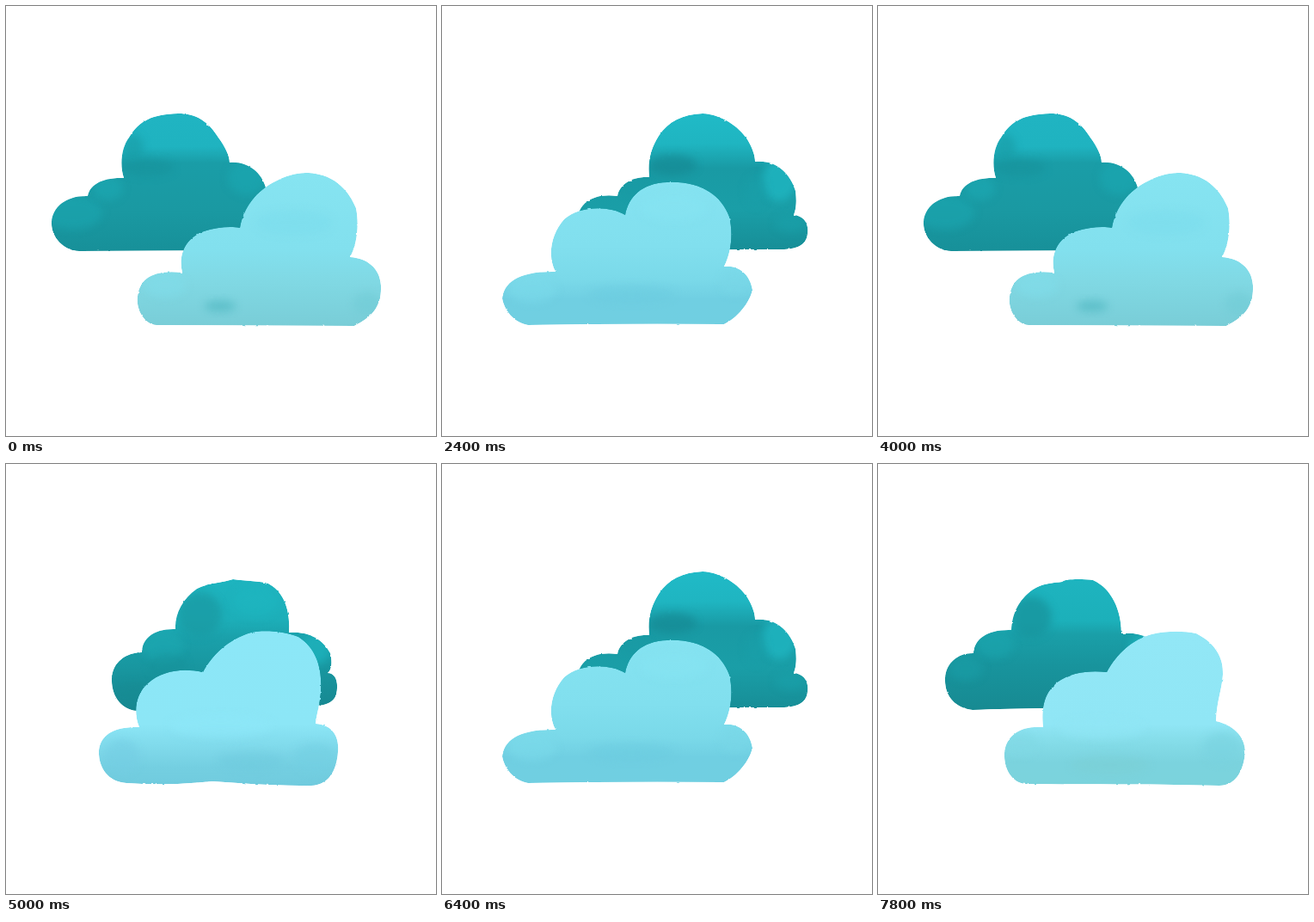
Recreate the animation shown at these times as an HTML page. Size 500x500 px, loop 8.01 s.

```html
<!DOCTYPE html>
<html lang="en">
<head>
<meta charset="utf-8">
<title>Drifting clouds</title>
<style>
html, body { margin: 0; width: 100%; height: 100%; overflow: hidden; background: #fff; }
svg { display: block; width: 100%; height: 100%; }
</style>
</head>
<body>
<svg id="stage" viewBox="0 0 500 500">
  <defs>
    <filter id="rough" color-interpolation-filters="sRGB">
      <feTurbulence type="fractalNoise" baseFrequency=".16" numOctaves="2" seed="4" result="noise"/>
      <feDisplacementMap in="SourceGraphic" in2="noise" scale="2" xChannelSelector="R" yChannelSelector="G"/>
      <feGaussianBlur stdDeviation=".4"/>
    </filter>
    <filter id="soft" x="-50%" y="-50%" width="200%" height="200%" color-interpolation-filters="sRGB">
      <feGaussianBlur stdDeviation="5"/>
    </filter>
  </defs>
</svg>
<script>
const stage = document.getElementById('stage');
const FRAME = 200, LOOP = 8010, HALF = 10, HOLD = 5;
const DARK_SPEED = 11.4, LIGHT_SPEED = -10;

// key: step at which the paths need no shift; stops: [offset, color]
// blobs: [cx, cy, rx, ry, color, opacity]
const drawings = [
  {
    key: 0,
    dark: {
      d: 'M85 285C66 284 52 268 53 251C54 234 70 220 95 221C97 208 112 199 137 200C132 185 134 165 143 153C155 133 170 126 200 125C222 125 236 135 247 153C255 164 260 174 260 182C280 180 297 193 302 211C306 226 304 238 300 243C320 243 325 270 305 284Z',
      stops: [[0, '#20b4c2'], [.24, '#1fb3c0'], [.36, '#1a9da7'], [.7, '#1a99a2'], [1, '#179099']],
      blobs: [[148, 165, 12, 16, '#1a9ea8', .7], [78, 240, 34, 20, '#1ba6b0', .6], [118, 212, 18, 14, '#1da9b3', .6],
        [280, 200, 22, 20, '#1ba8b2', .6], [165, 188, 30, 10, '#17929b', .6]]
    },
    light: {
      d: 'M175 371C160 370 151 352 153 338C155 318 170 306 205 310C200 290 208 270 230 262C245 257 262 256 272 258C276 235 290 215 315 203C330 195 342 194 352 194C385 196 400 218 407 235C411 255 408 278 400 292C420 293 435 305 436 325C437 350 425 362 405 372Z',
      stops: [[0, '#86e4f1'], [.5, '#82e0ee'], [.72, '#80d8e3'], [1, '#79cdd7']],
      blobs: [[249, 349, 18, 7, '#55bac4', .7], [335, 252, 45, 14, '#7bdcec', .5], [185, 325, 24, 14, '#80dce9', .6],
        [420, 346, 16, 13, '#70cad4', .5]]
    }
  },
  {
    key: 5,
    dark: {
      d: 'M152 287C135 286 122 270 123 249C124 230 140 219 158 219C158 203 172 191 197 192C196 175 205 157 222 145C235 138 252 138 264 134C280 136 296 136 305 139C322 148 331 168 329 196C350 194 368 203 377 220C380 232 378 240 374 243C384 243 387 255 384 268C381 278 370 281 360 281Z',
      stops: [[0, '#1eb4bf'], [.3, '#1dafb9'], [.45, '#1aa0aa'], [.7, '#18959e'], [1, '#178790']],
      blobs: [[225, 175, 26, 26, '#1a9aa3', .75], [182, 212, 24, 18, '#1da9b2', .6], [148, 268, 26, 14, '#178b93', .6],
        [290, 160, 28, 18, '#1eb7c1', .5], [360, 215, 18, 18, '#1eb2bc', .8], [188, 235, 22, 14, '#17929a', .5]]
    },
    light: {
      d: 'M140 371C118 370 107 352 108 333C110 315 125 305 155 306C148 290 150 268 165 255C182 240 205 237 229 242C240 222 258 204 285 196C300 192 325 195 340 201C362 215 368 240 366 265C365 280 361 292 360 302C378 303 388 315 386 335C384 358 375 373 355 374C320 374 280 372 240 369C200 373 170 373 140 371Z',
      stops: [[0, '#8ce7f7'], [.6, '#8ce6f6'], [.72, '#82dced'], [.88, '#74cfe1'], [1, '#70cbde']],
      blobs: [[135, 340, 20, 20, '#74cde3', .6], [250, 305, 60, 13, '#8de7f8', .6], [285, 345, 40, 10, '#6bc7db', .4],
        [360, 342, 26, 17, '#73cfe2', .6]]
    }
  },
  {
    key: 8,
    dark: {
      d: 'M188 284C170 284 155 268 157 250C158 232 172 217 204 221C206 208 220 198 241 199C239 180 243 165 252 151C263 134 280 126 303 125C325 126 345 140 355 155C361 165 364 174 364 181C388 178 405 195 411 215C413 230 411 238 409 243C420 244 427 252 425 265C424 278 412 283 395 283Z',
      stops: [[0, '#20bac7'], [.22, '#1fb5c1'], [.4, '#199aa4'], [.7, '#1a9ea7'], [1, '#178e97']],
      blobs: [[268, 185, 28, 12, '#168b95', .75], [392, 203, 20, 24, '#1fb3be', .9], [225, 210, 16, 12, '#1a9aa4', .6],
        [405, 253, 18, 10, '#1aa1aa', .6], [365, 215, 12, 18, '#1aa0aa', .5]]
    },
    light: {
      d: 'M100 371C82 368 72 352 70 340C72 322 88 308 132 309C122 290 127 265 142 248C160 232 195 232 213 243C217 222 232 206 262 205C300 203 325 220 334 245C339 265 336 288 328 303C345 301 358 312 361 330C358 345 343 363 328 370Q210 369 100 371Z',
      stops: [[0, '#85e3f1'], [.45, '#81dfee'], [.68, '#7ad9e9'], [.82, '#70cfe2'], [1, '#70cfe1']],
      blobs: [[105, 330, 28, 15, '#7bdaea', .6], [220, 335, 50, 10, '#6bcbdf', .5], [340, 322, 16, 14, '#78d6e6', .6],
        [270, 235, 40, 16, '#86e4f2', .5]]
    }
  },
  {
    key: 1,
    dark: {
      d: 'M110 286C90 284 77 270 78 249C79 230 95 219 111 220C112 203 128 192 155 193C156 175 163 158 180 146C190 139 205 138 214 137C218 133 240 134 250 135C272 145 283 170 283 197C306 195 322 203 331 220C334 232 332 240 328 243C338 243 341 255 338 268C335 278 324 281 314 281C250 284 160 284 110 286Z',
      stops: [[0, '#1eb4bf'], [.32, '#1cb0ba'], [.42, '#1a9fa8'], [.65, '#18949d'], [1, '#178a92']],
      blobs: [[178, 178, 24, 24, '#18959e', .8], [136, 210, 22, 16, '#1ba5ae', .6], [102, 238, 20, 14, '#1a9ea7', .6],
        [310, 215, 18, 18, '#1eb2bc', .8]]
    },
    light: {
      d: 'M172 372C156 371 146 355 147 336C149 316 165 304 192 306C190 285 192 268 208 254C225 242 245 240 266 242C278 220 296 204 318 198C335 194 355 194 370 197C392 208 402 225 401 245C400 262 394 275 393 299C412 303 427 316 427 335C425 358 415 374 397 374C330 372 250 373 172 372Z',
      stops: [[0, '#92e7f6'], [.6, '#90e6f5'], [.72, '#84dce8'], [.85, '#7bd3de'], [1, '#7bd3dc']],
      blobs: [[165, 325, 20, 14, '#80d8e4', .6], [260, 308, 50, 12, '#90e6f5', .6], [270, 350, 45, 10, '#7ccfd3', .5],
        [400, 330, 22, 18, '#79d2df', .6]]
    }
  }
];

function add(parent, tag, attrs) {
  const el = document.createElementNS('http://www.w3.org/2000/svg', tag);
  for (const name in attrs) el.setAttribute(name, attrs[name]);
  return parent.appendChild(el);
}

function makeCloud({ d, stops, blobs }, id) {
  const defs = stage.querySelector('defs');
  add(add(defs, 'clipPath', { id: 'clip-' + id }), 'path', { d });
  const fill = add(defs, 'linearGradient', { id: 'fill-' + id, x2: 0, y2: 1 });
  for (const [offset, color] of stops) add(fill, 'stop', { offset, 'stop-color': color });

  const cloud = add(stage, 'g', {});
  const paint = add(add(cloud, 'g', { filter: 'url(#rough)' }), 'g', { 'clip-path': `url(#clip-${id})` });
  add(paint, 'path', { d, fill: `url(#fill-${id})` });
  for (const [cx, cy, rx, ry, fill, opacity] of blobs)
    add(paint, 'ellipse', { cx, cy, rx, ry, fill, opacity, filter: 'url(#soft)' });
  return cloud;
}

const poses = drawings.map(({ key, dark, light }, i) => ({
  key,
  dark: makeCloud(dark, 'dark' + i),
  light: makeCloud(light, 'light' + i)
}));

function place(cloud, visible, dx) {
  cloud.setAttribute('display', visible ? 'inline' : 'none');
  cloud.setAttribute('transform', `translate(${dx} 0)`);
}

let shown = -1;
function draw(now) {
  const frame = Math.min(39, Math.floor((now % LOOP) / FRAME)) % (2 * HALF);
  if (frame === shown) return;
  shown = frame;
  const step = HALF - Math.abs(frame - HALF); // out and back
  const current = poses[Math.floor(frame / HOLD)];
  for (const pose of poses) {
    const moved = step - pose.key;
    place(pose.dark, pose === current, moved * DARK_SPEED);
    place(pose.light, pose === current, moved * LIGHT_SPEED);
  }
}

const start = performance.now();
function tick() {
  draw(performance.now() - start);
  requestAnimationFrame(tick);
}
tick();
</script>
</body>
</html>
```
